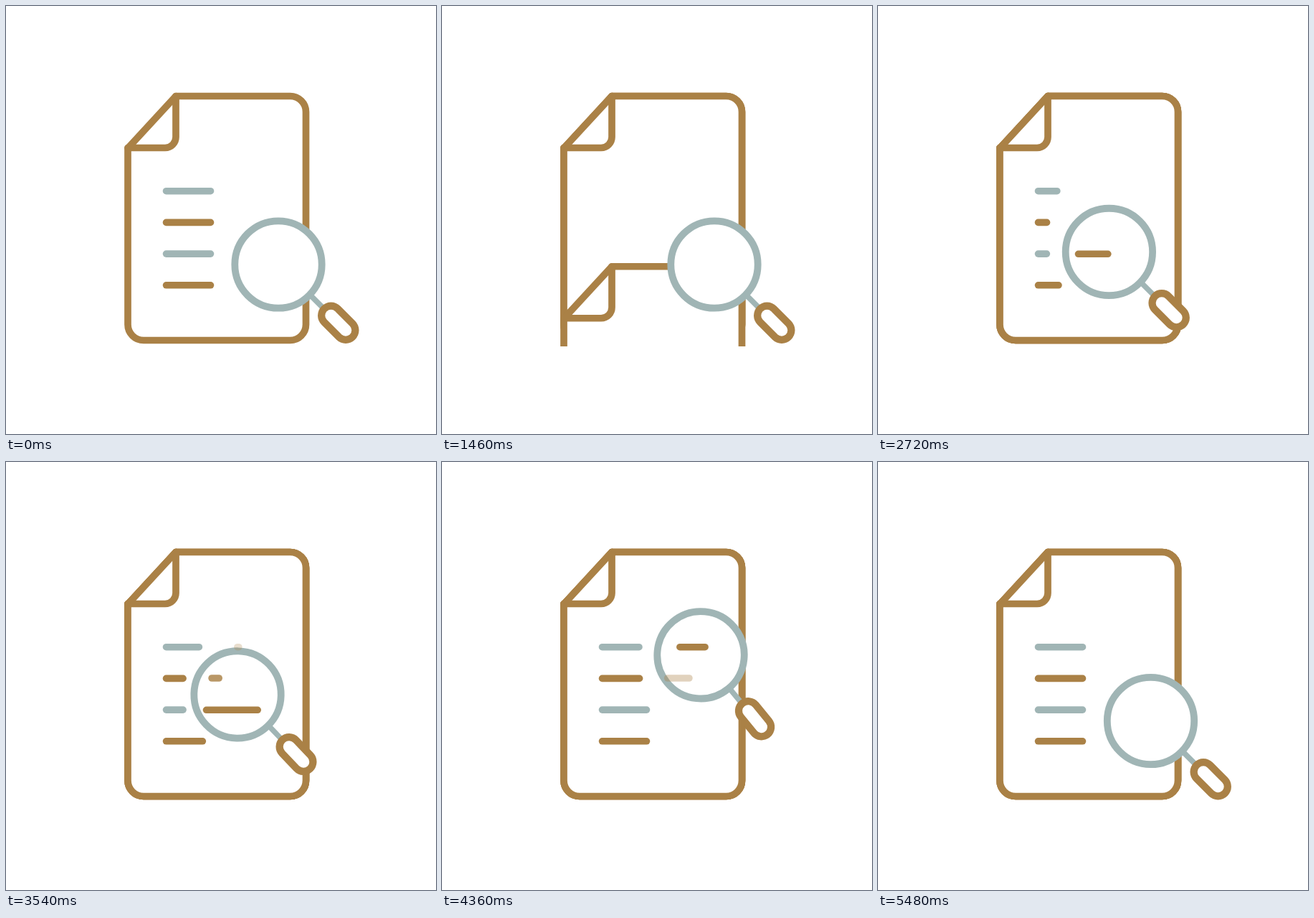
An HTML page for the animation above (5.5 s loop, 600 by 596 pixels).

```html
<!DOCTYPE html>
<html lang="en">
<head>
<meta charset="utf-8">
<title>Document search</title>
<style>
  html, body { margin: 0; width: 100%; height: 100%; overflow: hidden; background: #fff; }
  svg { display: block; width: 600px; height: 596px; }
  svg * { stroke-linecap: round; stroke-linejoin: round; }
  .gold { stroke: #aa8146; }
  .grey { stroke: #a0b5b5; }
  .line { stroke-width: 9.6; fill: none; }
</style>
</head>
<body>
<svg viewBox="0 0 600 596">
  <defs>
    <clipPath id="window"><rect width="600" height="474"/></clipPath>
    <g id="page" class="gold" stroke-width="9.7">
      <path fill="#fff" d="M170 198L237 125.5H396.5a22 22 0 0 1 22 22V443.5a22 22 0 0 1 -22 22H192a22 22 0 0 1 -22 -22Z"/>
      <path fill="none" d="M237 125.500V182.500a15 15 0 0 1 -15 15H170"/>
    </g>
  </defs>

  <g clip-path="url(#window)">
    <use href="#page"/>
    <g id="oldRows"></g>
    <use href="#page" class="sheet"/>
    <use href="#page" class="sheet"/>
  </g>

  <g id="newRows"></g>

  <g id="lens">
    <path class="grey" d="M44 42L62 60" stroke-width="7.5"/>
    <circle class="grey" r="60.7" stroke-width="9.8" fill="#fff"/>
    <path class="gold" d="M73.5 71L94 91.5" stroke-width="37"/>
    <path stroke="#fff" d="M73.5 71L94 91.5" stroke-width="16.5"/>
  </g>

  <g id="finds"></g>
</svg>
<script>
const LOOP = 5500, SLIDE = 580, RISE = 354, REDRAW = 2000, ROW_WIDTH = 62;
const $ = id => document.getElementById(id);
const clamp = u => Math.min(1, Math.max(0, u));
const smooth = u => u * u * (3 - 2 * u);
const easeOut = u => 1 - (1 - u) ** 2.5;
const bell = (t, mid, width) => Math.exp(-(((t - mid) / width) ** 2));

// Smooth curve through [time, value] points, never overshooting a point.
function track(...keys) {
  const slope = i => (keys[i + 1][1] - keys[i][1]) / (keys[i + 1][0] - keys[i][0]);
  const tangent = keys.map((_, i) => {
    if (i === 0 || i === keys.length - 1) return 0;
    const a = slope(i - 1), b = slope(i);
    return a * b > 0 ? 2 * a * b / (a + b) : 0;
  });
  return t => {
    if (t <= keys[0][0]) return keys[0][1];
    const i = keys.findIndex(k => k[0] > t) - 1;
    if (i < 0) return keys[keys.length - 1][1];
    const [t0, v0] = keys[i], [t1, v1] = keys[i + 1];
    const d = t1 - t0, u = (t - t0) / d, w = 1 - u;
    return v0 + (v1 - v0) * smooth(u) + d * u * w * (tangent[i] * w - tangent[i + 1] * u);
  };
}

function addLine(parent, tone) {
  const path = document.createElementNS('http://www.w3.org/2000/svg', 'path');
  path.setAttribute('class', 'line ' + tone);
  return parent.appendChild(path);
}

function setLine(el, from, to, y) {
  el.setAttribute('d', `M${from} ${y}H${to + 0.01}`);
}

const lensX = track([1960, 380], [3000, 310], [3540, 323], [4360, 361], [4920, 370.5], [5480, 380.5]);
const lensY = track([1960, 360], [2300, 351], [3540, 324], [4400, 268.5], [4920, 294], [5400, 360.5]);
const lensTurn = t => 6.1 * bell(t, 4200, 520);

// Share of each line written as the lens passes, top line first
const rows = [
  [0.2, 0.74, 0.83, 0.88],
  [0.1, 0.38, 0.84, 0.89],
  [0.1, 0.38, 1, 1],
  [0.22, 0.82, 1, 1]
].map(([a, b, c, d], i) => {
  const tone = i % 2 ? 'gold' : 'grey';
  const x = 223.5, y = 257.7 + 43.7 * i;
  setLine(addLine($('oldRows'), tone), x, x + ROW_WIDTH, y);
  return {
    x, y, el: addLine($('newRows'), tone),
    share: track([REDRAW, 0], [2300, a], [3540, b], [4360, c], [4920, d], [5450, 1])
  };
});

// Strokes found by the lens: each grows, drifts right and fades
const finds = [
  { y: 345.3, start: 2270, span: 1590, x: 279.5, drift: 0, reach: 73 },
  { y: 301, start: 3450, span: 980, x: 284, drift: 33, reach: 61 },
  { y: 257.7, start: 3512, span: 1630, x: 322.5, drift: 18, reach: 53 }
].map(find => ({ ...find, el: addLine($('finds'), 'gold') }));

const sheets = [...document.querySelectorAll('.sheet')];

function draw(t) {
  sheets.forEach((sheet, i) => {
    const u = clamp((t - 590 - 648 * i) / SLIDE);
    sheet.setAttribute('transform', `translate(0 ${RISE * (1 - smooth(u))})`);
  });

  $('newRows').style.opacity = t < REDRAW ? 0 : 1;
  for (const { el, x, y, share } of rows) setLine(el, x, x + ROW_WIDTH * share(t), y);

  $('lens').setAttribute('transform',
    `translate(${lensX(t)} ${lensY(t)}) rotate(${lensTurn(t)})`);

  for (const { el, y, start, span, x, drift, reach } of finds) {
    const u = clamp((t - start) / span);
    setLine(el, x + drift * u, x + reach * easeOut(u), y);
    el.style.opacity = clamp((t - start) / 110) * clamp((1 - u) / 0.2);
  }
}

const begin = performance.now();
function tick() {
  draw((performance.now() - begin) % LOOP);
  requestAnimationFrame(tick);
}
tick();
</script>
</body>
</html>
```
